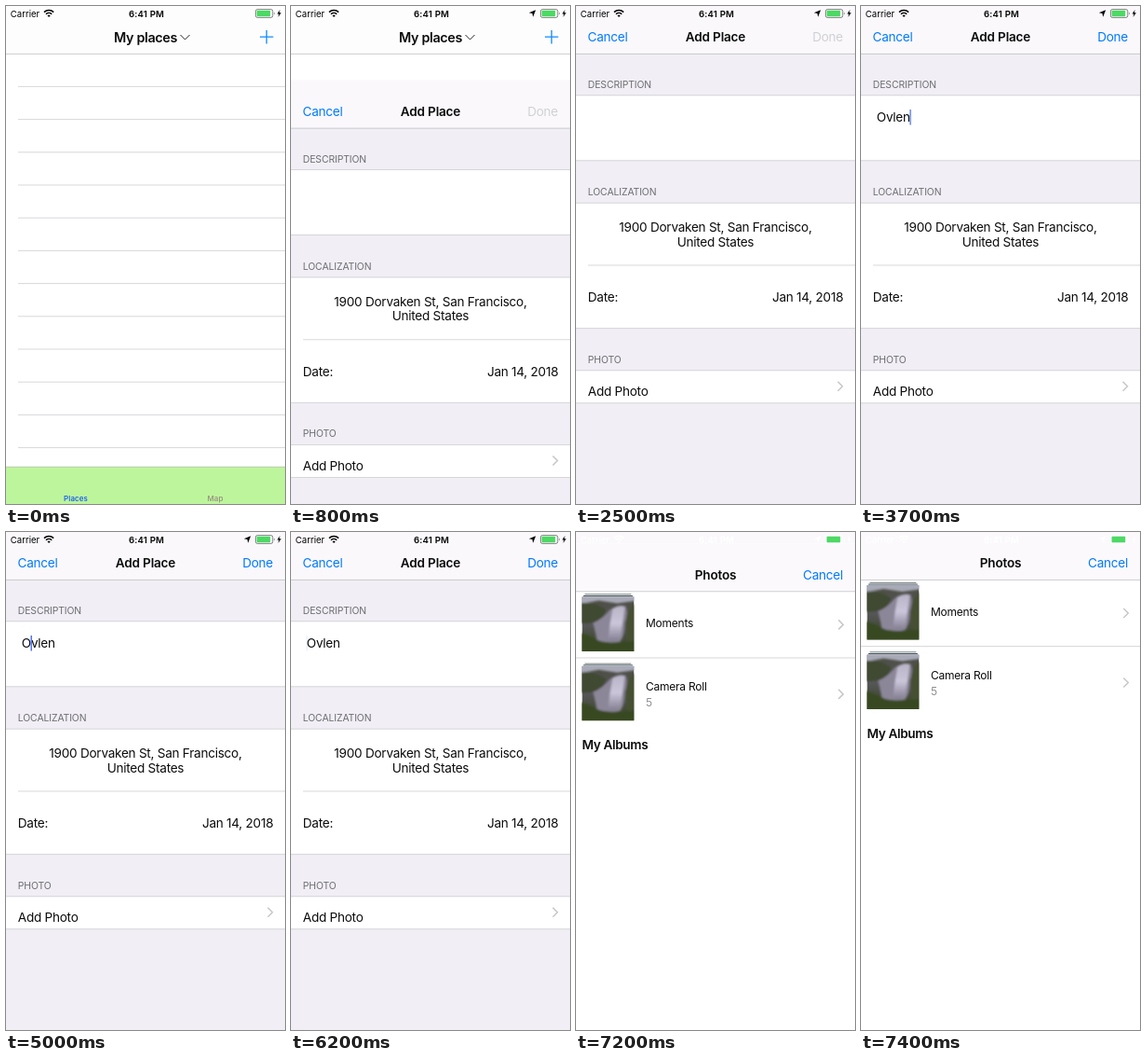
Write an HTML page that moves like this. It is 300 px wide and 534 px high and loops after 8000 ms.

```html
<!DOCTYPE html>
<html lang="en">
<head>
<meta charset="utf-8">
<title>Add a place</title>
<style>
  html, body { margin: 0; width: 100%; height: 100%; overflow: hidden; background: #fff; }
  svg { display: block; width: 100vw; height: 100vh; }
  text { font: 13.6px Inter, "Liberation Sans", sans-serif; letter-spacing: -.02em; fill: #0c0c0c; white-space: pre; }
  .bold { font-weight: 600; letter-spacing: -.015em; }
  .mid { text-anchor: middle; }
  .end { text-anchor: end; }
  .blue { fill: #007aff; }
  .section { font-size: 10.4px; letter-spacing: -.1px; fill: #6d6d72; }
  .album { font-size: 12px; }
  .tab { font-size: 8px; font-weight: 500; letter-spacing: .1px; }
  .status text { font-size: 9.6px; letter-spacing: 0; fill: currentColor; }
  .line { stroke: #c8c7cc; stroke-width: .7; fill: none; }
  .bar { stroke: #b8b8bc; stroke-width: .7; fill: none; }
  .chevron { stroke: #c7c7cc; stroke-width: 1.5; fill: none; }
</style>
</head>
<body>
<svg viewBox="0 0 300 534">
  <defs>
    <path id="chevron" class="chevron" d="M0 0l5 5-5 5"/>
    <linearGradient id="rock" x2="0" y2="1">
      <stop stop-color="#4b4d42"/><stop offset=".5" stop-color="#57575a"/><stop offset="1" stop-color="#35421f"/>
    </linearGradient>
    <linearGradient id="water" x2="0" y2="1">
      <stop stop-color="#b9b3c6"/><stop offset=".5" stop-color="#cbc6da"/><stop offset="1" stop-color="#857f92"/>
    </linearGradient>
    <clipPath id="crop"><rect width="56" height="58.5"/></clipPath>
    <filter id="soft"><feGaussianBlur stdDeviation="1.3"/></filter>
    <g id="photo">
      <path d="M3 -2.6h50" stroke="#777f7c" stroke-width="1"/>
      <path d="M1.5 -.9h53" stroke="#405560" stroke-width="1"/>
      <g clip-path="url(#crop)">
        <rect width="56" height="58.5" fill="url(#rock)"/>
        <g filter="url(#soft)">
          <path d="M-4-4h64v8L38 7 18 4-4 8z" fill="#a9aab8"/>
          <path d="M-4 7q18-2 30 7l-4 10Q10 30-4 28z" fill="#414a31"/>
          <path d="M12 28q10-4 18-14 8-6 17-4 3 8-1 18 0 14-5 20-14 4-25-2-2-10-4-18z" fill="#8c8699"/>
          <path d="M33 13q8-5 13-2-1 8-2 14l-3 20q-6 4-13 1 2-18 5-33z" fill="url(#water)"/>
          <path d="M60 6q-12 4-13 24l2 18 11 4z" fill="#474f33"/>
          <path d="M-4 38q14 4 22 9 14 4 42 0v16H-4z" fill="#394a22"/>
        </g>
      </g>
    </g>
  </defs>

  <rect width="300" height="534" fill="#fff"/>

  <g id="home">
    <path id="rows" class="line"/>
    <rect width="300" height="51" fill="#fdfdfd"/>
    <path class="bar" d="M0 51.4h300"/>
    <text class="bold" x="116" y="38.8" style="font-size:14.4px;letter-spacing:-.025em">My places</text>
    <path d="M187.5 31l5 5 5-5" fill="none" stroke="#222"/>
    <path id="plus" d="M273 33.2h14.4M280.2 26v14.4" stroke="#128aff" stroke-width="1.3"/>
    <rect y="494" width="300" height="40" fill="#bdf59c"/>
    <path class="bar" d="M0 494.2h300"/>
    <text class="tab mid" x="75" y="531.2" style="fill:#0b4fff">Places</text>
    <text class="tab mid" x="225" y="531.2" style="fill:#968c80">Map</text>
  </g>

  <g id="form">
    <rect width="300" height="534" fill="#f1eff5"/>
    <rect width="300" height="51" fill="#faf8fb"/>
    <path class="bar" d="M0 51.4h300"/>
    <text class="blue" x="12.5" y="38.4">Cancel</text>
    <text class="bold mid" x="150" y="38.4">Add Place</text>
    <text id="done" class="end" x="287" y="38.4">Done</text>

    <text class="section" x="12.8" y="87.8">DESCRIPTION</text>
    <text class="section" x="12.8" y="203.2">LOCALIZATION</text>
    <text class="section" x="12.8" y="382.6">PHOTO</text>
    <path d="M0 96h300v69.6H0zM0 211.4h300v134H0zM0 391h300v34.6H0z" fill="#fff"/>
    <rect id="tapped" y="391" width="300" height="34.6" fill="#d9d9d9"/>
    <path class="line" d="M0 95.8h300M0 165.8h300M0 211.2h300M13 278h287M0 345.6h300M0 390.8h300M0 425.8h300"/>

    <text id="entry" x="16.8" y="124"></text>
    <rect id="caret" y="111" width="1.4" height="16.5" fill="#426bf2"/>
    <text class="mid" x="150" y="241.8">1900 Dorvaken St, San Francisco,</text>
    <text class="mid" x="150" y="257.6">United States</text>
    <text x="12.8" y="317">Date:</text>
    <text class="end" x="287.3" y="317">Jan 14, 2018</text>
    <text x="12.8" y="418.4">Add Photo</text>
    <use href="#chevron" x="281.5" y="402.8"/>
  </g>

  <g id="picker">
    <rect width="300" height="534" fill="#fff"/>
    <rect width="300" height="51" fill="#fbf9fc"/>
    <path class="bar" d="M0 51.4h300"/>
    <text class="bold mid" x="150" y="38.4">Photos</text>
    <text class="blue end fade" x="287" y="38.4">Cancel</text>
    <use href="#photo" x="6.4" y="57"/>
    <use href="#photo" x="6.4" y="131.4"/>
    <path class="line" d="M0 122.6h300"/>
    <text class="album" x="75" y="89.8">Moments</text>
    <text class="album" x="75" y="158">Camera Roll</text>
    <text class="album fade" x="75" y="175" style="fill:#8e8e93">5</text>
    <text class="bold" x="6.4" y="221" style="letter-spacing:-.025em">My Albums</text>
    <use href="#chevron" x="282.3" y="82"/>
    <use href="#chevron" x="282.3" y="156.5"/>
  </g>

  <g id="status" class="status">
    <text x="4.8" y="11.6">Carrier</text>
    <path d="M41 6.6a7.2 7.2 0 0 1 10.2 0M43 8.7a4.4 4.4 0 0 1 6.2 0" fill="none" stroke="currentColor" stroke-width="1.5"/>
    <path d="M46.1 12l-1.6-1.7a2.3 2.3 0 0 1 3.2 0z" fill="currentColor"/>
    <text class="bold mid" x="151" y="11.6" style="letter-spacing:.02em">6:41 PM</text>
    <path id="arrow" d="M263.2 4.2l-3 7.6-.7-3.9-3.7-.6z" fill="currentColor"/>
    <rect x="268.4" y="3.6" width="18.4" height="8.8" rx="2" fill="none" stroke="currentColor" stroke-width=".8" opacity=".6"/>
    <path d="M288 6.4q1.6 1.6 0 3.2z" fill="currentColor" opacity=".6"/>
    <rect x="269.6" y="4.8" width="14.6" height="6.4" rx=".8" fill="#4cd964"/>
    <path d="M294.6 4l-3 4.5h1.9l-.9 3.6 3.3-4.8h-2z" fill="currentColor"/>
  </g>
</svg>
<script>
const LOOP = 8000, HEIGHT = 534;
const WORD = "Ovlen";
const FORM_START = 616, PICKER_START = 6891, ROW_TAP = 6700;

// [time, letters typed, caret index]; every entry restarts the caret blink
const EDITS = [
  [1800, 0, 0], [2600, 1, 1], [2800, 2, 2], [2900, 3, 3], [3100, 5, 5], [3190, 5, 5],
  [4700, 5, 3], [4800, 5, 2], [5000, 5, 1], [5200, 5, 0]
];

const el = id => document.getElementById(id);
const [plus, form, done, tapped, entry, caret, picker, status, arrow] =
  ["plus", "form", "done", "tapped", "entry", "caret", "picker", "status", "arrow"].map(el);
const fading = document.querySelectorAll(".fade");

const ramp = (t, from, to) => Math.min(1, Math.max(0, (t - from) / (to - from)));
const show = (node, visible) => node.setAttribute("visibility", visible ? "visible" : "hidden");

el("rows").setAttribute("d",
  Array.from({ length: 12 }, (_, i) => `M13 ${51.2 + 35.2 * (i + 1)}h287`).join(""));

// Critically damped spring that brings a sheet up from below
function slideUp(sheet, t, start) {
  const x = Math.max(0, t - start) * 0.01826;
  const y = HEIGHT * (1 + x) * Math.exp(-x);
  sheet.setAttribute("transform", `translate(0 ${y < 0.6 ? 0 : y})`);
  show(sheet, t > start);
}

function blink(age) {
  const phase = age % 1000;
  const fadeIn = age < 1000 ? 1 : ramp(phase, -20, 180);
  return Math.min(fadeIn, 1 - ramp(phase, 480, 700));
}

function drawEntry(t) {
  const edit = EDITS.filter(e => e[0] <= t).pop();
  const [time, typed, index] = edit || [0, 0, 0];
  const text = WORD.slice(0, typed);
  if (entry.textContent !== text) entry.textContent = text;
  done.style.fill = typed ? "#007aff" : "#d0d0d4";
  const caretX = 16.4 + (index ? entry.getSubStringLength(0, index) : 0);
  caret.setAttribute("x", caretX);
  caret.setAttribute("opacity", edit && t < ROW_TAP ? blink(t - time) : 0);
}

function draw(t) {
  plus.setAttribute("opacity", t < 500 ? 1 : 0.3 + 0.7 * ramp(t, 550, 750));
  show(arrow, t >= 600);
  slideUp(form, t, FORM_START);
  drawEntry(t);
  tapped.setAttribute("opacity", t >= ROW_TAP ? 1 : 0);
  slideUp(picker, t, PICKER_START);
  fading.forEach(node => node.setAttribute("opacity", ramp(t, PICKER_START, 7080)));
  const grey = Math.round(255 * ramp(t, PICKER_START, 7100));
  status.style.color = `rgb(${grey},${grey},${grey})`;
}

const begin = performance.now();
function tick() {
  draw((performance.now() - begin) % LOOP);
  requestAnimationFrame(tick);
}
tick();
</script>
</body>
</html>
```
